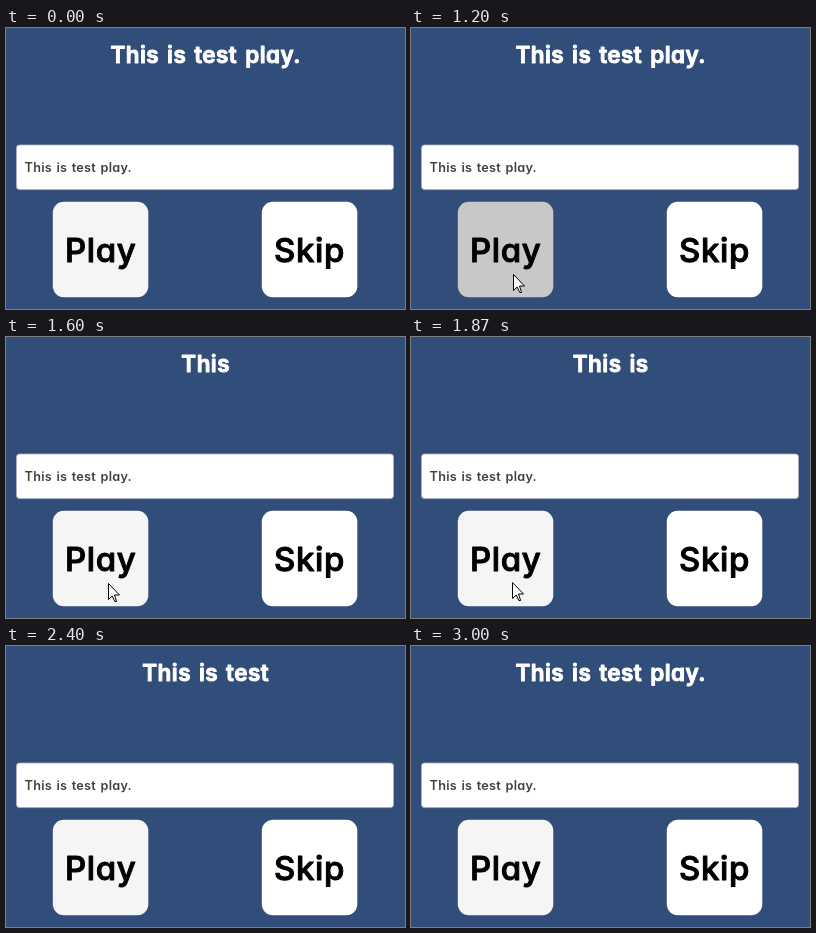
Write an HTML page that moves like this. It is 399 px wide and 281 px high and loops after 3.54 s.

```html
<!DOCTYPE html>
<html lang="en">
<head>
<meta charset="utf-8">
<title>Typewriter</title>
<style>
  html, body { margin: 0; width: 100%; height: 100%; overflow: hidden; background: #314d79; }
  svg { display: block; }
  text {
    font: 500 33px Inter, "DejaVu Sans", sans-serif;
    font-feature-settings: "cv11";
    letter-spacing: .02em; word-spacing: .08em;
    stroke-width: 1; stroke-linejoin: round;
    fill: #000; stroke: #000;
  }
  .mid { text-anchor: middle; }
  #title { font-size: 22.5px; font-weight: 600; fill: #fff; stroke: #fff; }
  #entry { font-size: 12.7px; font-weight: 600; fill: #404040; stroke: none; }
</style>
</head>
<body>
<svg width="399" height="281" viewBox="0 0 399 281">
  <text id="title" class="mid" x="199.7" y="34.5"></text>

  <rect x="10.5" y="117" width="377" height="44.6" rx="3" fill="#fff" stroke="#b0b2bc" stroke-width=".8"/>
  <text id="entry" x="18.5" y="144.3"></text>

  <rect id="play" x="46.8" y="173.8" width="95.5" height="95.5" rx="11"/>
  <text class="mid" x="94.7" y="233.6">Play</text>
  <rect x="255.8" y="173.8" width="95.5" height="95.5" rx="11" fill="#fff"/>
  <text class="mid" x="303.5" y="233.6">Skip</text>

  <path id="cursor" d="M.5 .5V16.5L4.2 13L6.8 18.5H8.6L6.5 12H11.5Z"
        fill="#fff" stroke="#000"/>
</svg>
<script>
const LOOP = 3540, TICK = 200 / 3, TYPE_START = 1266, CHAR_MS = 100;
const PHRASE = "This is test play.";
const [title, entry, play, cursor] =
  ["title", "entry", "play", "cursor"].map(id => document.getElementById(id));
entry.textContent = PHRASE;

function typed(t) {
  if (t < TYPE_START) return PHRASE;
  return PHRASE.slice(0, Math.floor((t - TYPE_START) / CHAR_MS) + 1).trim();
}

// Pressed grey fades back to the selected tint in 100 ms.
function shade(t) {
  if (t < 1199) return 245;
  const k = Math.min(1, Math.max(0, (t - 1249) / 100));
  return Math.round(200 + 45 * k);
}

function pointer(t) {
  if (t < 130 || t > 2190) return null;
  if (t < 460) {
    const left = (1 - (t - 90) / 370) ** 3;
    return [102 + 7 * left, 246 + 33 * left];
  }
  if (t < 1860) return [102, 246];
  if (t < 2060) return [101, 245];
  return t < 2130 ? [102, 247] : [106, 252];
}

function frame(now) {
  // The picture advances at 15 steps per second.
  const t = Math.floor((now % LOOP + 4) / TICK) * TICK;
  const pos = pointer(t), v = shade(t);
  title.textContent = typed(t);
  play.setAttribute("fill", `rgb(${v},${v},${v})`);
  cursor.setAttribute("visibility", pos ? "visible" : "hidden");
  if (pos) cursor.setAttribute("transform", `translate(${pos.map(Math.round)})`);
}

const start = performance.now();
function loop() {
  frame(performance.now() - start);
  requestAnimationFrame(loop);
}
loop();
</script>
</body>
</html>
```
